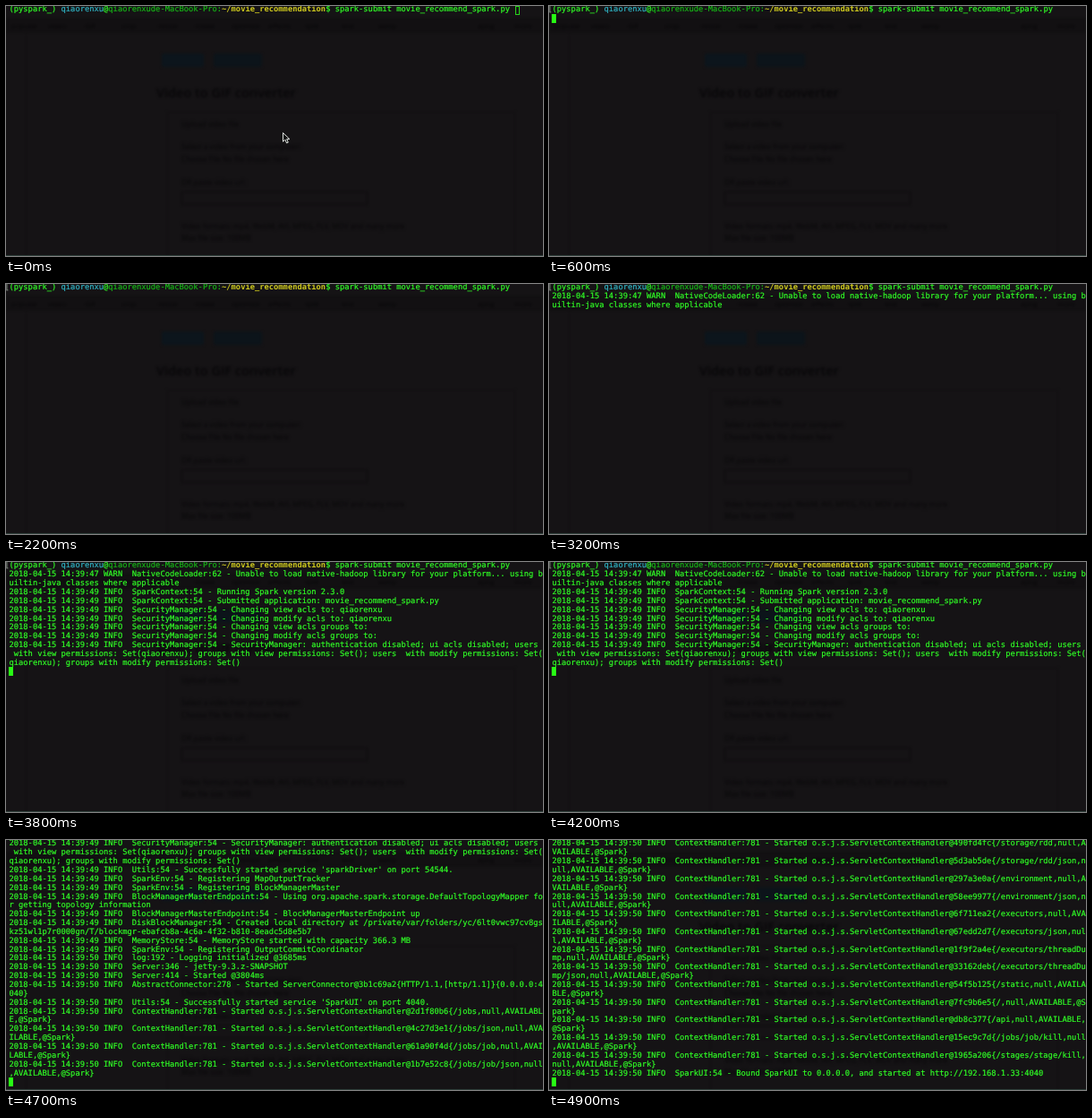
Write an HTML page that moves like this. It is 600 px wide and 279 px high and loops after 5 s.

```html
<!DOCTYPE html>
<html lang="en">
<head>
<meta charset="utf-8">
<title>Terminal session</title>
<style>
html, body { margin: 0; width: 100%; height: 100%; overflow: hidden; background: #151315; }
#stage { position: relative; width: 600px; height: 279px; overflow: hidden; background: #151315; }
#page { position: absolute; left: 0; top: 0; filter: blur(1.5px); }
#page text { fill: #070608; font-family: "Open Sans", Arial, sans-serif; }
#term { position: absolute; inset: 0; }
.row, .mark {
  position: absolute; margin: 0; left: 3.5px; height: 9.85px;
  font: 8.77px/9.85px "DejaVu Sans Mono", "Liberation Mono", monospace;
  color: #30ff26; -webkit-text-stroke: .2px currentColor;
  white-space: pre; text-rendering: geometricPrecision; font-variant-ligatures: none;
}
.mark { left: -1.5px; top: .4px; color: #8a948a; }
.user { color: #2fb4c4; }
.host { color: #16b616; }
.path { color: #d0cb1e; font-weight: bold; -webkit-text-stroke: 0; }
#cursor { position: absolute; box-sizing: border-box; width: 5.3px; height: 9.85px; background: #28fe14; }
#cursor.hollow { background: none; border: 1px solid #28d41a; }
#mouse { position: absolute; left: 308px; top: 140px; }
#edge { position: absolute; left: 0; right: 0; bottom: 0; height: 1px; background: #2c3c37; }
</style>
</head>
<body>
<div id="stage">
  <svg id="page" width="600" height="279">
    <rect y="13" width="600" height="17" fill="#121012"/>
    <path d="M22.5 30V279M180.5 118V279M568.5 118V279M180 118.5H568" stroke="#100e10" fill="none"/>
    <rect x="174" y="53" width="47" height="15" rx="2" fill="#0c151c"/>
    <rect x="232" y="53" width="54" height="15" rx="2" fill="#0c141a"/>
    <g id="nav" font-size="8"></g>
    <text x="168" y="102" font-size="14.5" font-weight="600">Video to GIF converter</text>
    <g font-size="8.2">
      <text x="196" y="135">Upload video file</text>
      <text x="196" y="160">Select a video from your computer:</text>
      <text x="196" y="174">Choose File  No file chosen here</text>
      <text x="196" y="200">OR paste video url:</text>
      <text x="196" y="249">Video formats: mp4, WebM, AVI, MPEG, FLV, MOV and many more</text>
      <text x="196" y="262">Max file size: 100MB</text>
    </g>
    <rect x="196.500" y="207.500" width="207" height="14" fill="none" stroke="#0d0b0d"/>
  </svg>
  <div id="term"></div>
  <div id="cursor"></div>
  <svg id="mouse" width="12" height="15">
    <path d="M1.500 1.500V11.300L3.900 9.200L5.600 13L7.300 12.200L5.700 8.600H8.900Z" fill="#111" stroke="#dfe3df" stroke-width="1"/>
  </svg>
  <div id="edge"></div>
</div>
<script>
const LOOP = 5000, COLS = 113, ROWS = 28, CW = 5.28, LH = 9.85, LEFT = 3.5;
const TEXT_TOP = 0.4, CURSOR_TOP = -0.9;
const ENTER = 500;
const $ = id => document.getElementById(id);

const user = 'qiaorenxu';
const command = 'spark-submit movie_recommend_spark.py';
const prompt = `(pyspark_) <span class="user">${user}</span>@<span class="host">${user}de-MacBook-Pro:</span>` +
  `<span class="path">~/movie_recommendation</span>$ ${command}`;
const promptCols = 107;

const log = (sec, src, msg, level = 'INFO') => `2018-04-15 14:39:${sec} ${level}  ${src} - ${msg}`;
const handler = s => {
  const [id, path] = s.split(' ');
  return log(50, 'ContextHandler:781', `Started o.s.j.s.ServletContextHandler@${id}{${path},null,AVAILABLE,@Spark}`);
};
const security = msg => log(49, 'SecurityManager:54', msg);
const blocks = msg => log(49, 'BlockManagerMasterEndpoint:54', msg);

// Each batch: time in ms, then the lines printed at that time
const batches = [
  [2400, log(47, 'NativeCodeLoader:62',
    'Unable to load native-hadoop library for your platform... using builtin-java classes where applicable', 'WARN')],
  [3700,
    log(49, 'SparkContext:54', 'Running Spark version 2.3.0'),
    log(49, 'SparkContext:54', 'Submitted application: movie_recommend_spark.py')],
  [3800,
    security(`Changing view acls to: ${user}`),
    security(`Changing modify acls to: ${user}`),
    security('Changing view acls groups to: '),
    security('Changing modify acls groups to: '),
    security('SecurityManager: authentication disabled; ui acls disabled; users  with view permissions: ' +
      `Set(${user}); groups with view permissions: Set(); users  with modify permissions: ` +
      `Set(${user}); groups with modify permissions: Set()`)],
  [4400,
    log(49, 'Utils:54', "Successfully started service 'sparkDriver' on port 54544."),
    log(49, 'SparkEnv:54', 'Registering MapOutputTracker'),
    log(49, 'SparkEnv:54', 'Registering BlockManagerMaster'),
    blocks('Using org.apache.spark.storage.DefaultTopologyMapper for getting topology information'),
    blocks('BlockManagerMasterEndpoint up'),
    log(49, 'DiskBlockManager:54', 'Created local directory at /private/var/folders/yc/' +
      '6lt0vwc97cv8gskz51wl1p7r0000gn/T/blockmgr-ebafcb8a-4c6a-4f32-b810-8eadc5d8e5b7'),
    log(49, 'MemoryStore:54', 'MemoryStore started with capacity 366.3 MB'),
    log(49, 'SparkEnv:54', 'Registering OutputCommitCoordinator')],
  [4500,
    log(50, 'log:192', 'Logging initialized @3685ms'),
    log(50, 'Server:346', 'jetty-9.3.z-SNAPSHOT')],
  [4600, log(50, 'Server:414', 'Started @3804ms')],
  [4700,
    log(50, 'AbstractConnector:278', 'Started ServerConnector@3b1c69a2{HTTP/1.1,[http/1.1]}{0.0.0.0:4040}'),
    log(50, 'Utils:54', "Successfully started service 'SparkUI' on port 4040."),
    ...['2d1f80b6 /jobs', '4c27d3e1 /jobs/json', '61a90f4d /jobs/job', '1b7e52c8 /jobs/job/json'].map(handler)],
  [4800,
    ...['5e08a1d7 /stages', '39c4b62f /stages/json', '72f1e09a /stages/stage', '0a63d8b5 /stages/stage/json',
      '48d7c31e /stages/pool', '6c2b95f0 /stages/pool/json', '13f8e64a /storage', '57a0d2c9 /storage/json',
      '490fd4fc /storage/rdd', '5d3ab5de /storage/rdd/json', '297a3e0a /environment',
      '58ee9977 /environment/json', '6f711ea2 /executors', '67edd2d7 /executors/json'].map(handler)],
  [4900,
    ...['1f9f2a4e /executors/threadDump', '33162deb /executors/threadDump/json', '54f5b125 /static',
      '7fc9b6e5 /', 'db8c377 /api', '15ec9c7d /jobs/job/kill', '1965a206 /stages/stage/kill'].map(handler),
    log(50, 'SparkUI:54', 'Bound SparkUI to 0.0.0.0, and started at http://192.168.1.33:4040')]
];

const wrap = line => line.match(new RegExp(`.{1,${COLS}}`, 'g'));
const rows = batches.flatMap(([at, ...lines]) => lines.flatMap(wrap).map(text => ({ at, text })));

// Focused cursor is off in these spans
const blinkOff = [[1000, 1500], [2100, 2400], [3000, 3600]];

const rowEls = Array.from({ length: ROWS }, (_, i) => {
  const el = document.createElement('pre');
  el.className = 'row';
  el.style.top = TEXT_TOP + i * LH + 'px';
  return $('term').appendChild(el);
});
const mark = document.createElement('pre');
mark.className = 'mark';
mark.textContent = '[';
$('term').appendChild(mark);

'popular video GIF crop resize rotate optimize effects split text webp apng more'.split(' ')
  .forEach((word, i) => {
    const x = 6 + i * 41 + (i > 10 ? 70 : 0);
    $('nav').insertAdjacentHTML('beforeend', `<text x="${x}" y="25">${word}</text>`);
  });

let last = -1;
function render(t) {
  const step = Math.floor(t / 100);
  if (step === last) return;
  last = step;

  const entered = t >= ENTER;
  const out = rows.filter(r => r.at <= t);
  const skip = Math.max(0, out.length + 2 - ROWS);
  rowEls.forEach((el, i) => {
    const n = i + skip;
    if (n === 0) el.innerHTML = prompt;
    else el.textContent = out[n - 1] ? out[n - 1].text : '';
  });

  mark.style.display = entered && !skip ? '' : 'none';
  $('mouse').style.display = entered ? 'none' : '';
  const cursor = $('cursor');
  const row = entered ? out.length + 1 - skip : 0;
  cursor.className = t < 100 ? 'hollow' : '';
  cursor.style.left = LEFT - 0.5 + (entered ? 0 : promptCols * CW + 0.8) + 'px';
  cursor.style.top = Math.max(0, CURSOR_TOP + row * LH) + 'px';
  cursor.style.display = blinkOff.some(([a, b]) => t >= a && t < b) ? 'none' : '';
}

const start = performance.now();
function tick() {
  render((performance.now() - start) % LOOP);
  requestAnimationFrame(tick);
}
tick();
</script>
</body>
</html>
```
